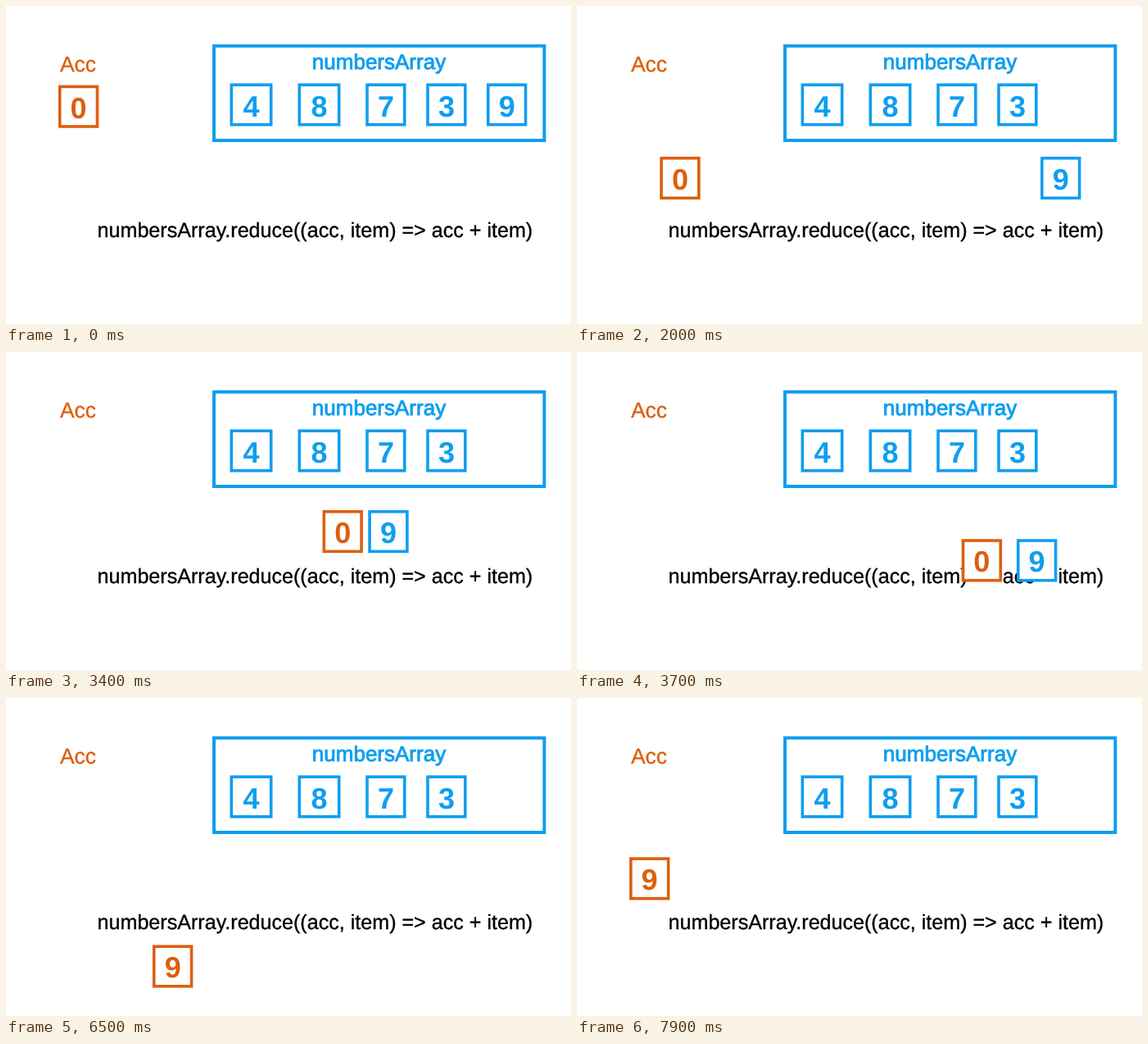
Animation of 690x388 px, one loop 8 s. Source, as an HTML page:

```html
<!DOCTYPE html>
<html lang="en">
<head>
<meta charset="utf-8">
<title>Array reduce</title>
<style>
  html, body { margin: 0; width: 100%; height: 100%; overflow: hidden; background: #fff; }
  svg { display: block; width: 100vw; height: 100vh; }
  text { font-family: "Liberation Sans", Arial, sans-serif; text-rendering: geometricPrecision; }
  .blue { --ink: #109eef; }
  .orange { --ink: #dd5f0d; }
  .cell rect { fill: #fff; stroke: var(--ink); stroke-width: 3.6; }
  .cell text { fill: var(--ink); font-size: 36px; font-weight: bold; text-anchor: middle; }
  .title { fill: var(--ink); stroke: var(--ink); }
</style>
</head>
<body>
<svg viewBox="0 0 690 388">
  <text x="111.6" y="282" font-size="25.1" stroke="#000" stroke-width=".35">numbersArray.reduce((acc, item) =&gt; acc + item)</text>
  <g id="cells"></g>
  <rect class="blue" x="254" y="48.7" width="403.4" height="115.3" fill="none" stroke="var(--ink)" stroke-width="4"/>
  <text class="blue title" x="455.5" y="76.5" font-size="26" text-anchor="middle" stroke-width=".9">numbersArray</text>
  <text class="orange title" x="66" y="79.8" font-size="26.4" stroke-width=".35">Acc</text>
</svg>
<script>
const LOOP = 8000, STEP = 100;
const cells = document.getElementById('cells');

function add(parent, tag, attrs, text = '') {
  const el = document.createElementNS('http://www.w3.org/2000/svg', tag);
  for (const name in attrs) el.setAttribute(name, attrs[name]);
  el.textContent = text;
  parent.append(el);
  return el;
}

// A boxed digit centred on (x, y).
function cell(color, digit, x, y, width = 49.4) {
  const g = add(cells, 'g', { class: `cell ${color}` });
  add(g, 'rect', { x: -width / 2 + 1.8, y: -24.3, width: width - 3.6, height: 48.6 });
  add(g, 'text', { x: 0, y: 14 }, digit);
  place(g, [x, y]);
  return g;
}

function place(g, [x, y]) {
  g.setAttribute('transform', `translate(${x} ${y})`);
}

const smooth = p => Math.sin(p * Math.PI / 2) ** 2;
const quick = p => smooth(p ** 0.65);

// Each move: start time, duration, easing, target point.
function positionAt(t, start, moves) {
  let [x, y] = start;
  for (const [begin, duration, ease, [tx, ty]] of moves) {
    const k = ease(Math.min(1, Math.max(0, (t - begin) / duration)));
    x += (tx - x) * k;
    y += (ty - y) * k;
  }
  return [x, y];
}

cell('blue', 4, 299.5, 120.5, 52);
cell('blue', 8, 382.5, 120.5, 52);
cell('blue', 7, 463.9, 120.5);
cell('blue', 3, 537.9, 120.5);

const actors = [
  { // current item
    el: cell('blue', 9, 611.7, 120.5), from: 0, to: 4800, start: [611.7, 120.5],
    moves: [
      [250, 900, smooth, [611.7, 210]],
      [1912, 850, quick, [442.6, 210]],
      [3307, 800, quick, [613, 273.5]],
    ],
  },
  { // accumulator
    el: cell('orange', 0, 88.6, 122.7), from: 0, to: 4800, start: [88.6, 122.7],
    moves: [
      [250, 900, smooth, [88.6, 210]],
      [1912, 850, quick, [389.8, 210]],
      [3307, 800, quick, [539.5, 273.5]],
    ],
  },
  { // sum
    el: cell('orange', 9, 583, 325.6), from: 4800, to: LOOP, start: [583, 325.6],
    moves: [
      [6058, 800, quick, [89, 328]],
      [7220, 850, smooth, [88.6, 209]],
    ],
  },
];

function draw(now) {
  const t = Math.floor(now % LOOP / STEP) * STEP;
  for (const { el, from, to, start, moves } of actors) {
    el.style.display = t >= from && t < to ? '' : 'none';
    place(el, positionAt(t, start, moves));
  }
}

const origin = performance.now();
function tick() {
  draw(performance.now() - origin);
  requestAnimationFrame(tick);
}
tick();
</script>
</body>
</html>
```
